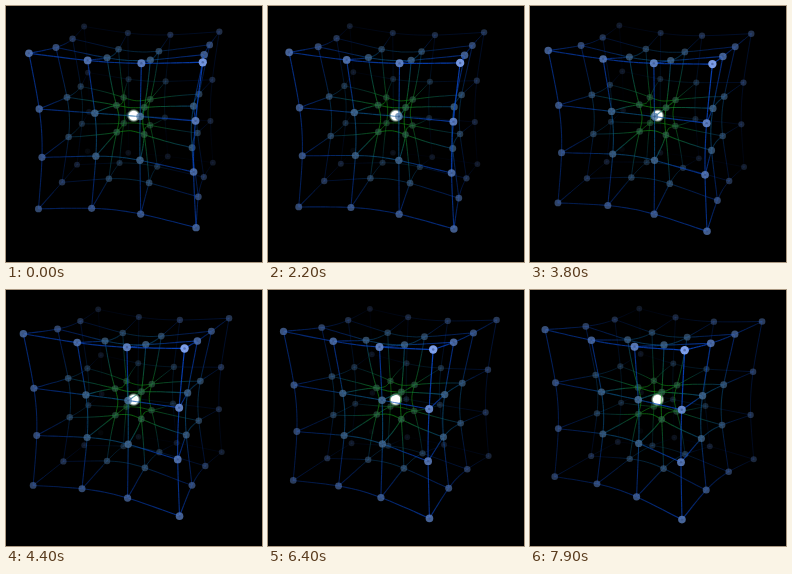
Write an HTML page with a canvas that moves like this. It is 256 by 256 pixels and loops after 8000 ms.

```html
<!DOCTYPE html>
<html lang="en">
<head>
<meta charset="utf-8">
<title>Warped lattice</title>
<style>
  html, body { margin: 0; width: 100%; height: 100%; overflow: hidden; background: #000; }
  canvas { display: block; width: 100vw; height: 100vh; }
</style>
</head>
<body>
<canvas id="stage" width="256" height="256"></canvas>
<script>
const ctx = document.getElementById('stage').getContext('2d');
const LOOP = 8000, HOLD = 1500, STEP = 100;
const CENTER = { x: 127.7, y: 109.6 };
const FOCAL = 546, DISTANCE = 7.3;
const PITCH_SIN = 0.314, PITCH_COS = 0.949;
const START_YAW = -13.5, YAW_STEP = -0.309;
const SEGMENTS = 10;
const GRID = [-1, -1 / 3, 1 / 3, 1];

const clamp = v => Math.max(0, Math.min(1, v));
const mix = (a, b, k) => a.map((v, i) => v + (b[i] - v) * k);
const rgba = (c, a) => `rgba(${c.map(Math.round).join(',')},${a.toFixed(3)})`;

// Pull a point toward the central mass; corners stay in place.
const pull = r => 1 - Math.exp(-1.13 * r);
const PULL_AT_CORNER = pull(Math.sqrt(3));
function warp(p) {
  const g = pull(Math.hypot(...p)) / PULL_AT_CORNER;
  return p.map(v => v * g);
}

const nodes = [];
const edges = [];
for (const a of GRID) for (const b of GRID) {
  for (const c of GRID) nodes.push(warp([a, b, c]));
  for (let i = 0; i < 3; i++) {
    const from = GRID[i], to = GRID[i + 1];
    for (const place of [v => [v, a, b], v => [a, v, b], v => [a, b, v]]) {
      edges.push(Array.from({ length: SEGMENTS + 1 },
        (_, k) => warp(place(from + (to - from) * k / SEGMENTS))));
    }
  }
}

function project([px, py, pz], yaw) {
  const c = Math.cos(yaw), s = Math.sin(yaw);
  const x = px * c + pz * s, z = pz * c - px * s;
  const depth = z * PITCH_COS + py * PITCH_SIN;
  const scale = FOCAL / (DISTANCE - depth);
  return {
    x: CENTER.x + x * scale,
    y: CENTER.y - (py * PITCH_COS - z * PITCH_SIN) * scale,
    depth,
    light: clamp(0.5 + 0.32 * depth),
    size: scale / (FOCAL / DISTANCE),
    outer: clamp((Math.hypot(px, py, pz) - 0.3) / 0.8)
  };
}

function disc(x, y, r, fill) {
  ctx.fillStyle = fill;
  ctx.beginPath();
  ctx.arc(x, y, r, 0, Math.PI * 2);
  ctx.fill();
}

function drawSegment(p, q) {
  const light = (p.light + q.light) / 2;
  const outer = (p.outer + q.outer) / 2;
  const color = mix([18, 145, 22], [8, 72, 205], outer);
  const alpha = 0.9 * Math.pow(light, 1.6) + 0.3 * (1 - outer);
  ctx.strokeStyle = rgba(color, alpha);
  ctx.lineWidth = 0.8 + 0.4 * light;
  ctx.beginPath();
  ctx.moveTo(p.x, p.y);
  ctx.lineTo(q.x, q.y);
  ctx.stroke();
}

function drawNode(p) {
  const near = clamp((p.light - 0.7) / 0.3);
  const body = mix(mix([55, 115, 85], [82, 118, 180], p.outer), [140, 175, 255], near * near);
  const alpha = clamp(0.05 + p.light);
  const r = 3.3 * p.size;
  disc(p.x, p.y, r, rgba(body, alpha * 0.9));
  disc(p.x, p.y, r * 0.3, rgba(mix(body, [25, 40, 80], 0.6), alpha * 0.7));
}

function drawMass() {
  const { x, y } = CENTER;
  const glow = ctx.createRadialGradient(x, y, 0, x, y, 7);
  glow.addColorStop(0, '#fff');
  glow.addColorStop(0.62, '#fff');
  glow.addColorStop(0.8, 'rgba(190,225,200,.55)');
  glow.addColorStop(1, 'rgba(60,130,70,0)');
  disc(x, y, 7, glow);
}

function draw(time) {
  const step = time < HOLD ? 0 : Math.floor((time - HOLD) / STEP) + 1;
  const yaw = (START_YAW + YAW_STEP * step) * Math.PI / 180;
  const items = [{ depth: 0, paint: drawMass }];
  for (const edge of edges) {
    const pts = edge.map(p => project(p, yaw));
    for (let i = 0; i < SEGMENTS; i++) {
      const p = pts[i], q = pts[i + 1];
      items.push({ depth: (p.depth + q.depth) / 2 - 0.1, paint: () => drawSegment(p, q) });
    }
  }
  for (const node of nodes) {
    const p = project(node, yaw);
    items.push({ depth: p.depth, paint: () => drawNode(p) });
  }
  items.sort((a, b) => a.depth - b.depth);

  ctx.fillStyle = '#000';
  ctx.fillRect(0, 0, 256, 256);
  items.forEach(item => item.paint());
}

const start = performance.now();
function tick() {
  draw((performance.now() - start) % LOOP);
  requestAnimationFrame(tick);
}
tick();
</script>
</body>
</html>
```
